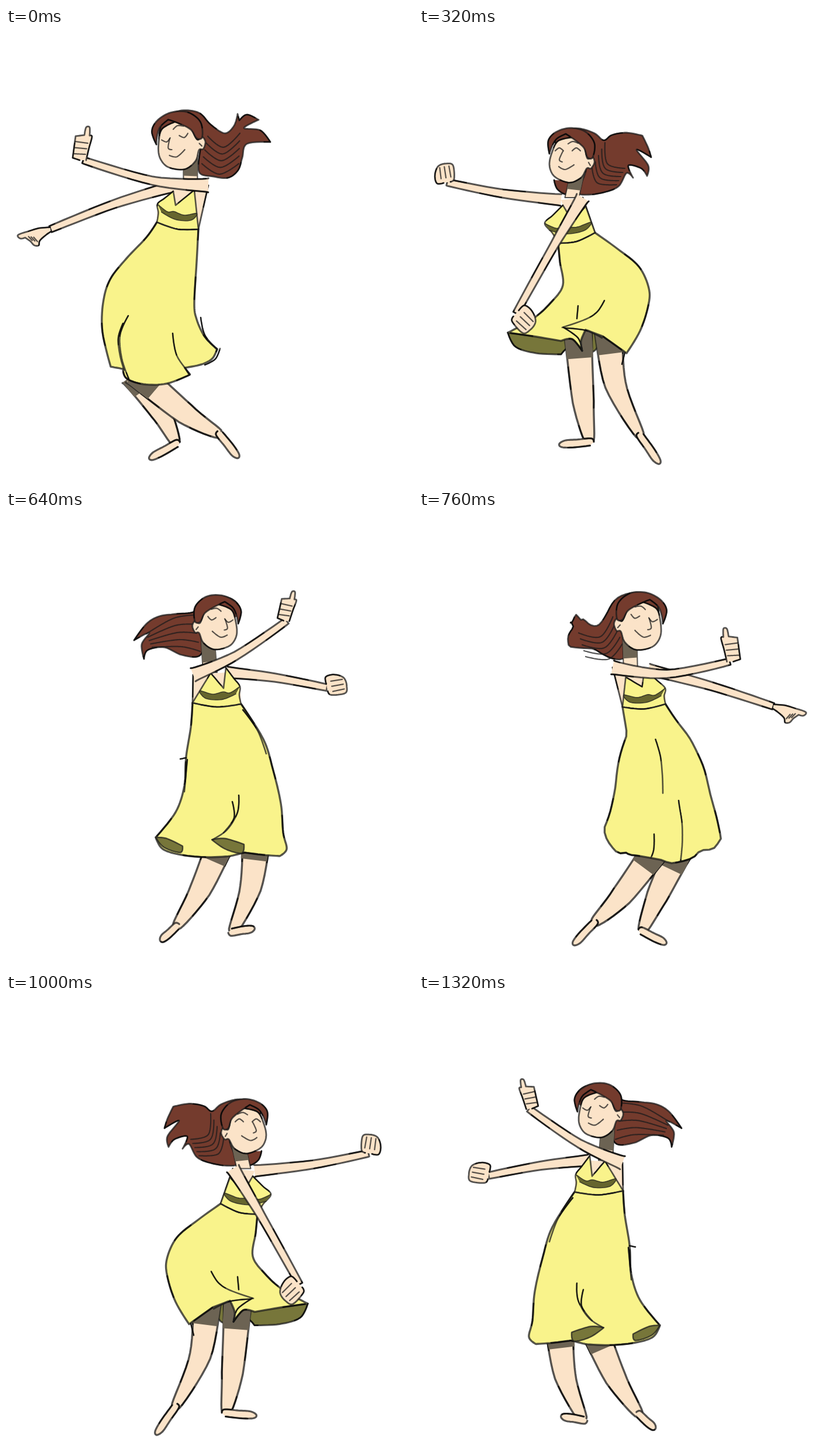
Animation, 696 px wide and 778 px high, one loop 1360 ms. Source, as an HTML page:

```html
<!DOCTYPE html>
<html lang="en">
<head>
<meta charset="utf-8">
<title>Dancing woman</title>
<style>
html, body { margin: 0; width: 100%; height: 100%; overflow: hidden; background: #fff; }
svg { display: block; width: 100%; height: 100%; }
path { stroke-linecap: round; stroke-linejoin: round; }
</style>
</head>
<body>
<svg viewBox="0 0 696 778"><g id="dancer"></g></svg>
<script>
const SKIN = '#fbe3c8', HAIR = '#743b2d', DRESS = '#f9f38b';
const OLIVE = '#77763a', BUST = '#66652e', SHADE = '#6c6353', NONE = 'none';

// ---- geometry ----
const lerp = (a, b, k) => a + (b - a) * k;
const mid = (p, q, k = 0.5) => [lerp(p[0], q[0], k), lerp(p[1], q[1], k)];
const add = (p, x, y) => [p[0] + x, p[1] + y];

// "x,y x,y*": a star marks a corner
const points = text => text.split(' ').map(s => {
  const p = s.replace('*', '').split(',').map(Number);
  p.hard = s.endsWith('*');
  return p;
});

// Hermite curve through the points, as a fine polyline
function smooth(p) {
  const last = p.length - 1, out = [p[0]];
  const slope = (i, a) => p[i].hard || i < 1 || i === last ? 0 : (p[i + 1][a] - p[i - 1][a]) / 2;
  for (let i = 0; i < last; i++)
    for (let u = 1 / 8; u <= 1; u += 1 / 8) {
      const e = u * u * (3 - 2 * u), v = 1 - u;
      out.push([0, 1].map(a => lerp(p[i][a], p[i + 1][a], e)
        + slope(i, a) * u * v * v - slope(i + 1, a) * u * u * v));
    }
  return out;
}

// Evenly spaced points along a polyline
function resample(line, n = 72) {
  const len = [0];
  for (let i = 1; i < line.length; i++)
    len.push(len[i - 1] + Math.hypot(line[i][0] - line[i - 1][0], line[i][1] - line[i - 1][1]));
  const out = [];
  for (let j = 0, i = 1; j <= n; j++) {
    const d = len[len.length - 1] * j / n;
    while (i < line.length - 1 && len[i] < d) i++;
    out.push(mid(line[i - 1], line[i], (d - len[i - 1]) / (len[i] - len[i - 1] || 1)));
  }
  return out;
}

const mixPoints = (p, q, k) => p.map((v, i) => mid(v, q[i], k));
const mixLines = (p, q, k) => mixPoints(resample(p), resample(q), k);

// Strokes spread evenly from one guide to another
const fan = (a, b, n) => Array.from({ length: n }, (_, i) => mixLines(a, b, i / (n - 1)));

function place(shape, origin, deg, size = 1, flip = 1, dir = 1) {
  const c = Math.cos(deg * Math.PI / 180) * size, s = Math.sin(deg * Math.PI / 180) * size;
  return shape.map(p => {
    const y = p[1] * flip;
    return Object.assign(add(origin, dir * (p[0] * c - y * s), p[0] * s + y * c), { hard: p.hard });
  });
}

// Tapered tube around a bent bone
function limb(joints, [w0, w1, w2]) {
  const c = smooth(joints), last = c.length - 1;
  const side = sign => c.map((p, i) => {
    const a = c[Math.max(i - 1, 0)], b = c[Math.min(i + 1, last)], u = 2 * i / last;
    const w = sign * (u < 1 ? lerp(w0, w1, u) : lerp(w1, w2, u - 1));
    const len = Math.hypot(b[0] - a[0], b[1] - a[1]);
    return add(p, (b[1] - a[1]) / len * w, (a[0] - b[0]) / len * w);
  });
  return [...side(1), ...side(-1).reverse()];
}

function foot(ankle, toe) {
  const dx = toe[0] - ankle[0], dy = toe[1] - ankle[1], l = Math.hypot(dx, dy);
  const sole = [[0, -6], [l * .55, -7], [l * .93, -5], [l, 1], [l * .8, 6], [l * .4, 6], [-3, 6], [-7, 0]];
  return smooth(place(sole, ankle, Math.atan2(dy, dx) * 180 / Math.PI));
}

// ---- shared shapes ----
// Head faces left, about its centre
const FACE = points('5,-38 -18,-32 -28,-14 -33,8 -27,26 -12,36 5,39 22,30 31,15 38,15 44,5 41,-4 32,-2 28,-20');
const CAP = points('-33,-10 -35,-32 -22,-47 2,-54 28,-48 44,-28 41,-4 32,-4 26,-20 10,-34 -5,-44* -20,-36 -28,-24 -33,-10');

// Hands point along x from the wrist: outline, first and last finger line
const HANDS = {
  thumb: ['0,-6* 4,-18* 41,-13* 43,2* 56,5 56,11 42,11* 40,15 21,10 0,5*', '32,-14 29,8', '11,-16 10,4'],
  fist: ['0,-6* 1,-17 12,-19 24,-15 31,-8 32,4 27,15 4,13 0,6*', '8,-9 27,-8', '8,8 27,8'],
  point: ['0,4* 22,6 41,4 66,0 63,-8 53,-8* 44,-17 38,-26 29,-28 25,-19 11,-10 0,-5*', '46,-7 40,-16', '36,-10 30,-20'],
  flat: ['0,4* 32,3 56,0* 57,-23* 38,-22 34,-27 22,-28 9,-17 0,-5*', '50,-3 48,-22', '34,-12 30,-25']
};

// ---- poses ----
// head: x, y, size, tilt, side faced (1 left), eyelid arc
// arms: shoulder elbow wrist; legs: hip knee ankle toe
// top: front strap, bust, back strap, neckline; hands: kind, angle, size, flip
const reach = {
  head: [294, 201, 1.07, -14, 1, 1],
  near: '346,269 250,261 132,226', nearHand: ['thumb', -90, 1, 1],
  far: '285,271 185,301 76,344', farHand: ['point', 170, .85, 1],
  legA: '232,610 264,655 291,711 245,736', legB: '246,608 306,659 366,695 397,735',
  top: '286,279 259,301 322,277 290,303',
  hair: '262,190* 264,170 276,152 300,141 330,145 350,165 374,180 390,167 396,147* 399,158* 412,148 432,157* 407,171 435,175 452,195* 412,198 404,222 397,243 380,256 355,254 330,246 333,205',
  strands: '345,185 372,204 400,180|335,232 365,250 398,232',
  skirt: '258,332* 240,358 206,394 178,430 166,470 165,520 179,579* 200,583* 206,599 235,609 275,608 314,593* 306,581* 335,575 353,565 361,549* 340,528 326,498 322,470 326,400 329,344*',
  folds: '209,492 195,525 198,565 210,600|200,505 192,530 195,560 202,585|285,522 292,560 315,592|333,495 340,525 361,550|340,576 358,566 366,548'
};
const thumbOut = {
  head: [281, 175, 1.06, -8, 1, 1],
  near: '328,249 238,279 141,272', nearHand: ['thumb', -92, .95, -1],
  far: '266,254 148,282 48,307', farHand: ['fist', 175, 1.35, 1],
  legA: '236,577 258,646 282,709 245,725', legB: '308,571 338,641 372,697 410,732',
  top: '278,243 235,288 307,274 283,281',
  hair: '255,149* 256,134 270,123 298,120 323,131 338,151 343,181 350,204 368,208 383,199 390,187* 384,210 399,198* 400,216 388,239 368,253 333,256 283,241 265,234 260,219 298,206 313,176',
  strands: '328,160 344,212 390,220|306,206 323,239 368,249',
  skirt: '235,311* 213,346 196,376 186,421 173,481 137,541* 130,548* 148,561 173,561 198,571 233,578* 247,566* 268,562 298,564 334,576* 342,531 344,471 338,421 323,386 298,356* 311,309*',
  flap: '130,548* 168,551 206,573* 173,569 146,562 130,548*',
  folds: '239,481 243,511 231,578|327,259 316,301 300,363|247,566 240,578 228,577'
};
const lowSwing = {
  head: [256, 225, 1, 0, 1, -1],
  near: '280,290 232,370 166,488', nearHand: ['fist', 42, 1.15, 1],
  far: '243,294 143,283 48,264', farHand: ['fist', -100, 1, 1],
  legA: '274,548 281,640 292,708 240,712', legB: '328,545 336,610 379,698 411,745',
  top: '246,303 215,334 285,305 262,330',
  hair: '233,196* 234,181 252,174 275,172 300,180 316,192 330,183 355,179 382,184* 392,205 397,221* 372,208 392,235 390,253* 380,240 358,235 366,256* 355,248 342,270 320,280 290,285 272,280 285,245 285,205|231,260 237,276 255,284 272,262',
  strands: '318,196 322,232 352,240|296,240 305,265 338,268',
  under: '152,521* 165,545 200,556 243,558* 258,545 280,553 300,552 314,530* 290,512 240,515',
  skirt: '238,368* 241,400 246,440 225,470 195,497 152,521* 195,527 243,535* 262,532 279,552* 277,535 285,516* 314,527* 355,556* 378,518 392,475 393,445 376,408 340,378 301,350*',
  folds: '317,466 305,485 285,498 245,512|272,475 270,497|247,512 272,530 279,552|250,513 285,517 313,530|352,555 347,575'
};
const highSwing = {
  head: [321, 186, .97, 0, 1, -1],
  near: '334,248 257,204 151,177', nearHand: ['point', 160, 1, 1],
  far: '290,218 215,156 142,107', farHand: ['flat', 180, 1, 1],
  legA: '287,560 290,630 296,706 263,682', legB: '370,550 374,630 379,713 409,687',
  top: '290,246 266,275 314,244 298,266',
  hair: '284,190* 288,155 302,140 322,135 350,138 372,152 382,175 374,200 371,215 382,235 383,250 376,262 386,269 401,262* 396,277 383,283 368,279 357,264 335,281* 330,250 345,215 350,180|283,160 268,195 252,212 248,235 254,260 268,280* 278,250 292,225 300,190',
  strands: '368,182 354,225 374,258 393,276|342,230 342,252 350,260 368,278',
  under: '222,552* 240,560 258,553 300,560 318,566 345,565 395,553 459,540* 420,535 380,520 335,530 300,548 240,543',
  skirt: '272,300* 260,355 248,415 236,475 234,515 222,552* 240,542 270,543 315,552 345,550* 333,538 332,525 355,516 385,520 420,535 459,540* 440,515 420,465 405,420 380,380 355,340 331,296*',
  folds: '297,473 318,492 328,522|236,475 234,515|350,520 340,530 350,545|397,415 380,375'
};
const turned = {
  head: [363, 198, 1, -8, -1, 1],
  near: '320,280 394,247 480,188', nearHand: ['thumb', -85, .9, 1],
  far: '378,276 460,285 549,302', farHand: ['fist', -12, 1.05, 1],
  legA: '358,588 332,648 291,711 264,735', legB: '425,586 418,645 387,720 425,714',
  top: '376,268 400,300 350,277 372,303',
  hair: '400,180* 398,162 385,150 365,146 340,152 322,172 290,176 262,180 240,193 219,221* 245,208 232,228 236,253* 242,238 270,233 300,246 330,248 338,225 325,190',
  strands: '320,178 285,184 240,210|332,240 300,232 250,233',
  skirt: '319,328* 316,370 308,420 305,470 290,515 256,558* 268,578 300,588 345,592 384,590* 408,584* 440,588 468,590* 480,578 474,550 470,500 456,440 440,390 402,330*',
  flap: '256,558* 275,560 302,573* 298,584 270,575 256,558*|352,562* 375,560 407,570* 403,585 375,578 352,562*',
  folds: '398,486 396,515 378,545 353,562|387,497 390,525 372,550|405,340 430,375 445,415|310,425 305,480|298,424 308,422'
};
// Arms sweep overhead while the body turns
const overhead = {
  head: [343, 191, 1, 0, -1, -1],
  near: '310,262 298,165 336,80', nearHand: ['fist', -70, 1.15, 1],
  far: '362,255 420,155 468,96', farHand: ['fist', -80, 1, 1],
  top: '350,254 372,286 318,262 340,284',
  hair: '300,190* 303,160 320,143 345,139 375,152 388,180 392,210 410,235 400,262 380,250 370,270* 340,240 320,265 285,270 262,262* 285,245 292,220 296,195',
  strands: '300,205 298,230 284,260|325,225 318,245 305,262'
};

const BONES = ['near', 'far', 'legA', 'legB', 'top'];
const SHAPES = ['hair', 'strands', 'under', 'skirt', 'flap', 'folds'];

function build(raw) {
  const pose = { ...raw };
  for (const key of BONES) if (raw[key]) pose[key] = points(raw[key]);
  for (const key of SHAPES) if (raw[key]) pose[key] = raw[key].split('|').map(s => smooth(points(s)));
  return pose;
}

function between(a, b, k = 0.5) {
  const pose = { ...a, head: a.head.map((v, i) => lerp(v, b.head[i], k)) };
  for (const key of BONES) pose[key] = mixPoints(a[key], b[key], k);
  for (const key of SHAPES)
    pose[key] = a[key] && b[key] ? a[key].slice(0, b[key].length).map((l, i) => mixLines(l, b[key][i], k)) : [];
  return pose;
}

// ---- drawing ----
function draw(pose) {
  let svg = '';
  const ink = (line, fill, width = 3) => {
    const d = 'M' + line.map(p => p[0].toFixed(1) + ' ' + p[1].toFixed(1)).join('L');
    svg += `<path d="${d}" fill="${fill}" stroke="#1c1c1c" stroke-opacity=".74" stroke-width="${width}"/>`;
    // darker stretches where the pen went over twice
    if (width > 2.5)
      svg += `<path d="${d}" fill="none" stroke="#000" stroke-opacity=".7" stroke-width="${width * .8}" stroke-dasharray="38 64"/>`;
  };
  const all = (key, fill, width) => (pose[key] || []).forEach(line => ink(line, fill, width));

  const arm = (joints, [kind, deg, size, flip], width) => {
    const put = s => smooth(place(points(s), joints[2], deg, size, flip));
    const [outline, first, last] = HANDS[kind].map(put);
    ink(limb(joints, [width, 7, 5.5]), SKIN);
    ink(outline, SKIN, 2.8);
    fan(first, last, 3).forEach(line => ink(line, NONE, 2.2));
  };

  const leg = ([hip, knee, ankle, toe]) => {
    const start = mid(hip, knee, -0.4);
    ink(limb([start, knee, ankle], [25, 18, 6]), SKIN, 3.4);
    ink(foot(ankle, toe), SKIN, 3.2);
    ink(limb([start, hip, mid(hip, knee, .18)], [24, 23, 22]), SHADE, 0);
  };

  const [hx, hy, size, tilt, dir, lid] = pose.head;
  const onHead = shape => place(shape, [hx, hy], tilt, size, 1, dir);
  const feature = (...p) => ink(smooth(onHead(p)), NONE, 2.2);

  const edge = pose.skirt[0], ends = [edge[0], edge[edge.length - 1]];
  const [front, back] = dir > 0 ? ends : ends.reverse();
  const [strap, bust, rear, dip] = pose.top;
  const shoulder = mid(pose.near[0], pose.far[0]);
  const sag = (k, y) => add(mid(front, back, k), 0, y);

  all('hair', HAIR, 2.8);
  if (pose.strands.length) fan(...pose.strands, 5).forEach(line => ink(line, NONE, 2.2));
  arm(pose.far, pose.farHand, 10);
  all('under', OLIVE, 3);
  leg(pose.legA);
  leg(pose.legB);
  all('skirt', DRESS, 3.4);
  all('flap', OLIVE, 2.4);

  const [jawA, jawB] = onHead([[2, 28], [28, 16]]);
  const baseA = add(shoulder, -12 * dir, -2), baseB = add(shoulder, 12 * dir, -2);
  ink([jawA, baseA, baseB, jawB], SKIN, 2);
  ink([jawA, mid(jawA, baseA, .6), mid(jawB, baseB, .75), jawB], SHADE, 0);
  ink([pose.near[0], pose.far[0], strap, bust, front, back], SKIN, 0);
  ink([pose.near[0], back], NONE, 2.8);

  ink(smooth([strap, mid(strap, bust, .55), bust, add(mid(bust, front), 2 * dir, 0), front, sag(.5, 6), back,
    mid(back, rear), rear, dip, strap].map((p, i) => Object.assign([...p], { hard: [4, 6, 8, 9].includes(i) }))), DRESS, 2.6);
  const cup = mid(back, rear, .4), across = (k, y) => add(mid(bust, cup, k), 0, y);
  ink(smooth([bust, across(.25, 9), across(.42, 6), across(.68, 8), cup, across(.85, 14), across(.45, 19), across(.1, 12)]), BUST, 1.6);
  ink(smooth([front, sag(.5, 6), back]), NONE, 2.4);
  all('folds', NONE, 2.6);

  ink(smooth(onHead(FACE)), SKIN, 2.8);
  for (const x of [13, -16]) feature([x - 7, -15], [x, -15 + 5 * lid], [x + 7, -15]);
  feature([-1, -27], [7, -31], [16, -28]);
  feature([-10, -14], [-16, 0], [-11, 4]);
  feature([-17, 12], [-6, 17], [9, 9]);
  feature([34, 5], [37, 10]);
  ink(smooth(onHead(CAP)), HAIR, 2.8);
  arm(pose.near, pose.nearHand, 12);
  return svg;
}

const [A, B, C, D, E] = [reach, thumbOut, lowSwing, highSwing, turned].map(build);
const cells = [A, between(A, B), B, between(B, C), C, between(C, D), D,
  { ...between(D, E), ...build(overhead) }, E].map(draw);

const dancer = document.getElementById('dancer');
const HALF = 680, STEP = 80;
let shown = -1;

// The second half of the dance mirrors the first
function tick(now) {
  const t = now % (2 * HALF), mirrored = t >= HALF;
  const cell = Math.floor(t % HALF / STEP);
  const id = cell + (mirrored ? cells.length : 0);
  if (id !== shown) {
    shown = id;
    dancer.innerHTML = cells[cell];
    dancer.setAttribute('transform', mirrored ? 'translate(668 8.5) scale(-1 1)' : '');
  }
  requestAnimationFrame(tick);
}
tick(0);
</script>
</body>
</html>
```
